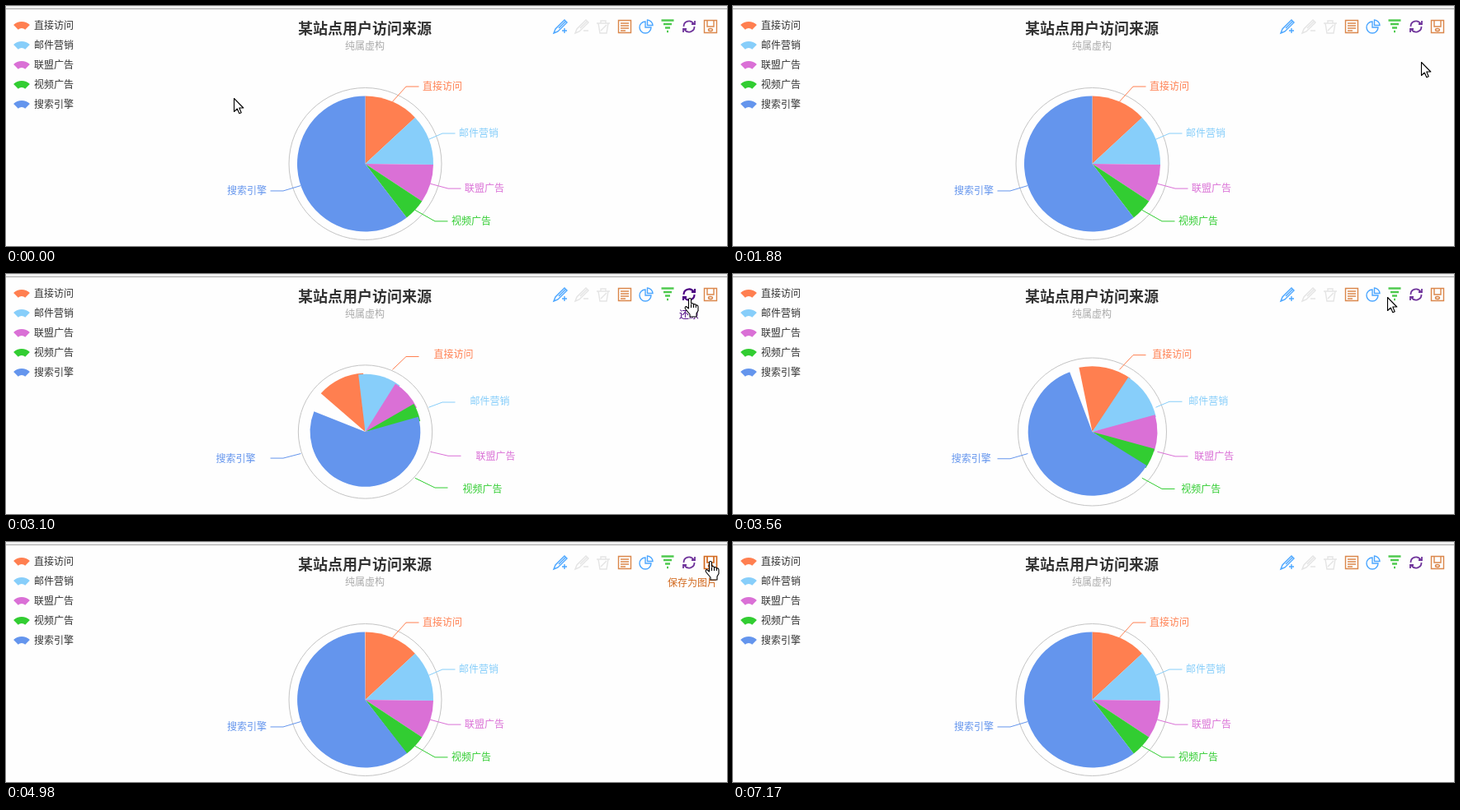
Animation of 874 by 292 pixels, one loop 8 s. Source, as an HTML page with a canvas:

```html
<!DOCTYPE html>
<html lang="zh-CN">
<head>
<meta charset="utf-8">
<title>饼图</title>
<style>
  html, body { margin: 0; width: 100%; height: 100%; overflow: hidden; background: #fefefe; }
  canvas { display: block; width: 874px; height: 292px; }
</style>
</head>
<body>
<canvas id="stage" width="874" height="292"></canvas>
<script>
const ctx = document.getElementById('stage').getContext('2d');
const FONT = '"Noto Sans CJK SC", "Noto Sans CJK", sans-serif';
const LOOP = 8000, TAU = Math.PI * 2;
const CX = 435.5, CY = 192, R = 82.5, RING = 92.5, LABEL = 102.5;
const RESTORE = 2510, FIRST = 2670, STEP = 138.5;

// name, value, colour, elbow of the label line
const slices = [
  ['直接访问', 335, '#ff7f50', 485],
  ['邮件营销', 310, '#87cefa', 529],
  ['联盟广告', 234, '#da70d6', 536],
  ['视频广告', 135, '#32cd32', 520],
  ['搜索引擎', 1548, '#6495ed', 336]
];
const total = slices.reduce((sum, s) => sum + s[1], 0);

// Toolbox: outline in a 16 px box, colour, tooltip, line width
const pen = 'M0 16L5 14L16 3L13 0L2 11ZM6 10L14 2M10 13H16';
const icons = [
  [pen + 'M13 10V16', '#1e90ff', '辅助线开关'],
  [pen, '#ddd'],
  ['M0 4H16M2 4L4 16H12L14 4M5 4V1H11V4M5 13L12 6', '#ddd'],
  ['M.5 .5H15.5V15.5H.5ZM3 4H13M3 7H13M3 10H13M3 13H9', '#d2691e'],
  ['M7 2A7 7 0 1 0 14 9H7ZM9.5 0A7 7 0 0 1 16 6.5H9.5Z', '#1e90ff'],
  ['M.5 .5H15.5M3 5H13M5 9.500H11M7 14H9', '#22bb22', '漏斗图切换', 2.4],
  ['M1.5 8A6.5 6.5 0 0 1 13.500 4.500M15 1V5H11M14.500 8A6.5 6.5 0 0 1 2.500 11.500M1 15V11H5',
    '#4b0082', '还原', 1.8],
  ['M.5 .5H15.5V15.5H.5ZM4 0V8H12V0M5.500 12A2.500 1.500 0 1 0 10.500 12A2.500 1.500 0 1 0 5.500 12',
    '#d2691e', '保存为图片']
].map(([d, color, tip, width = 1.4], i) =>
  ({ path: new Path2D(d), color, tip, width, x: 672 + i * 26 }));

const arrow = new Path2D('M.5 .5V16.5L4.3 13L6.8 18.8L9.2 17.8L6.8 12H11.8Z');
const hand = new Path2D('M-1.5 13V2Q-1.5 .5 0 .5T1.5 2V7Q4 6 4.5 8Q7 7 7.3 9' +
  'Q10 8.500 10 11V15.500L8 19V23H0V20L-5.500 13.500Q-6.500 11 -4.500 10.500Z' +
  'M1.5 8V12M4.5 8V12M7.3 9V12');

// Pointer stops: arrival time, x, y
const stops = [
  [0, 276, 112], [510, 266, 106], [1070, 229, 111], [1500, 728, 138],
  [1880, 834, 68], [2220, 832, 31], [3100, 829, 29], [3410, 793, 28],
  [4140, 803, 28], [4500, 854, 23], [5800, 722, 28], [6100, 671, 28],
  [6620, 665, 28], [6900, 728, 135], [7050, 758, 188]
];
const LEAVE = 7170;

const lerp = (a, b, k) => a + (b - a) * k;

// Remaining share of an exponential ease-out
function rest(age, duration) {
  const t = age / duration;
  return t >= 1 ? 0 : 2 ** (-10 * t);
}

function text(str, x, y, color, align = 'left', size = '12px') {
  ctx.font = size + ' ' + FONT;
  ctx.fillStyle = color;
  ctx.textAlign = align;
  ctx.textBaseline = 'middle';
  ctx.fillText(str, x, y);
}

function drawFrame() {
  ctx.fillStyle = '#fefefe';
  ctx.fillRect(0, 0, 874, 292);
  ctx.fillStyle = '#f0f0f0';
  ctx.fillRect(0, 0, 874, 3);
  ctx.fillStyle = '#a8a8a8';
  ctx.fillRect(0, 3, 874, 1);
  text('某站点用户访问来源', 435, 27, '#333', 'center', 'bold 18px');
  text('纯属虚构', 435, 48, '#aaa', 'center');
  slices.forEach(([name, , color], i) => {
    const y = 24 + i * 24;
    ctx.beginPath();
    ctx.arc(19, y + 9, 14, -TAU * 3 / 8, -TAU / 8);
    ctx.arc(19, y + 9, 6, -TAU / 8, -TAU * 3 / 8, true);
    ctx.fillStyle = color;
    ctx.fill();
    text(name, 34, y - .5, '#333');
  });
}

function drawPie(age) {
  ctx.lineWidth = 1;
  ctx.strokeStyle = '#c4c4c4';
  ctx.beginPath();
  ctx.arc(CX, CY, RING * (1 - rest(age, 1900)), 0, TAU);
  ctx.stroke();

  const left = rest(age, 2000);
  let from = -TAU / 4;
  slices.forEach(([name, value, color, elbow], i) => {
    const span = value / total * TAU, mid = from + span / 2;
    const lag = rest(age, 2000 + 100 * i), a = from - lag * TAU;
    ctx.fillStyle = ctx.strokeStyle = color;
    ctx.beginPath();
    ctx.moveTo(CX, CY);
    ctx.arc(CX, CY, R * (1 - lag), a, a + span);
    ctx.fill();

    const side = elbow > CX ? 1 : -1, end = elbow + side * 15.5;
    const rootY = CY + R * Math.sin(mid), y = CY + LABEL * Math.sin(mid);
    const lineY = lerp(y, rootY, left);
    ctx.beginPath();
    ctx.moveTo(CX + R * Math.cos(mid), rootY);
    ctx.lineTo(elbow, lineY);
    ctx.lineTo(end, lineY);
    ctx.stroke();
    text(name, end + side * (4.5 + 100 * left), y - .5, color, side > 0 ? 'left' : 'right');
    from += span;
  });
}

function drawTools(hover) {
  for (const icon of icons) {
    const on = icon === hover;
    ctx.save();
    ctx.translate(icon.x - 8, 17);
    ctx.globalAlpha = on ? 1 : .8;
    ctx.strokeStyle = icon.color;
    ctx.lineWidth = icon.width + (on ? .3 : 0);
    ctx.stroke(icon.path);
    ctx.restore();
    if (on) {
      // keep long tooltips on the stage
      const x = Math.min(icon.x, 862 - icon.tip.length * 6);
      text(icon.tip, x, 49, icon.color, 'center');
    }
  }
}

function drawPointer(x, y, path) {
  ctx.save();
  ctx.translate(x, y);
  ctx.lineJoin = 'round';
  ctx.lineWidth = 1.1;
  ctx.fillStyle = '#fff';
  ctx.strokeStyle = '#000';
  ctx.fill(path);
  ctx.stroke(path);
  ctx.restore();
}

// Each move is seen in two jumps: halfway, then at the stop
function pointerAt(t) {
  const next = stops.findIndex(s => s[0] > t);
  const [, x, y] = stops.at(next < 0 ? -1 : next - 1);
  if (next < 0 || stops[next][0] - t > STEP) return [x, y];
  const [, nx, ny] = stops[next];
  return [lerp(x, nx, .5), lerp(y, ny, .5)].map(Math.round);
}

function render(now) {
  const t = now % LOOP;
  const [x, y] = pointerAt(t);
  const hover = icons.find(i => i.tip && Math.abs(x - i.x) <= 8 && Math.abs(y - 27) <= 8);
  const overPie = Math.hypot(x - CX, y - CY) < R;
  const tick = FIRST + Math.floor((t - FIRST) / STEP) * STEP;
  drawFrame();
  drawPie(t < FIRST ? Infinity : tick - RESTORE);
  drawTools(hover);
  if (t < LEAVE) drawPointer(x, y, hover || overPie ? hand : arrow);
}

const began = performance.now();
function loop() {
  render(performance.now() - began);
  requestAnimationFrame(loop);
}
loop();
</script>
</body>
</html>
```
